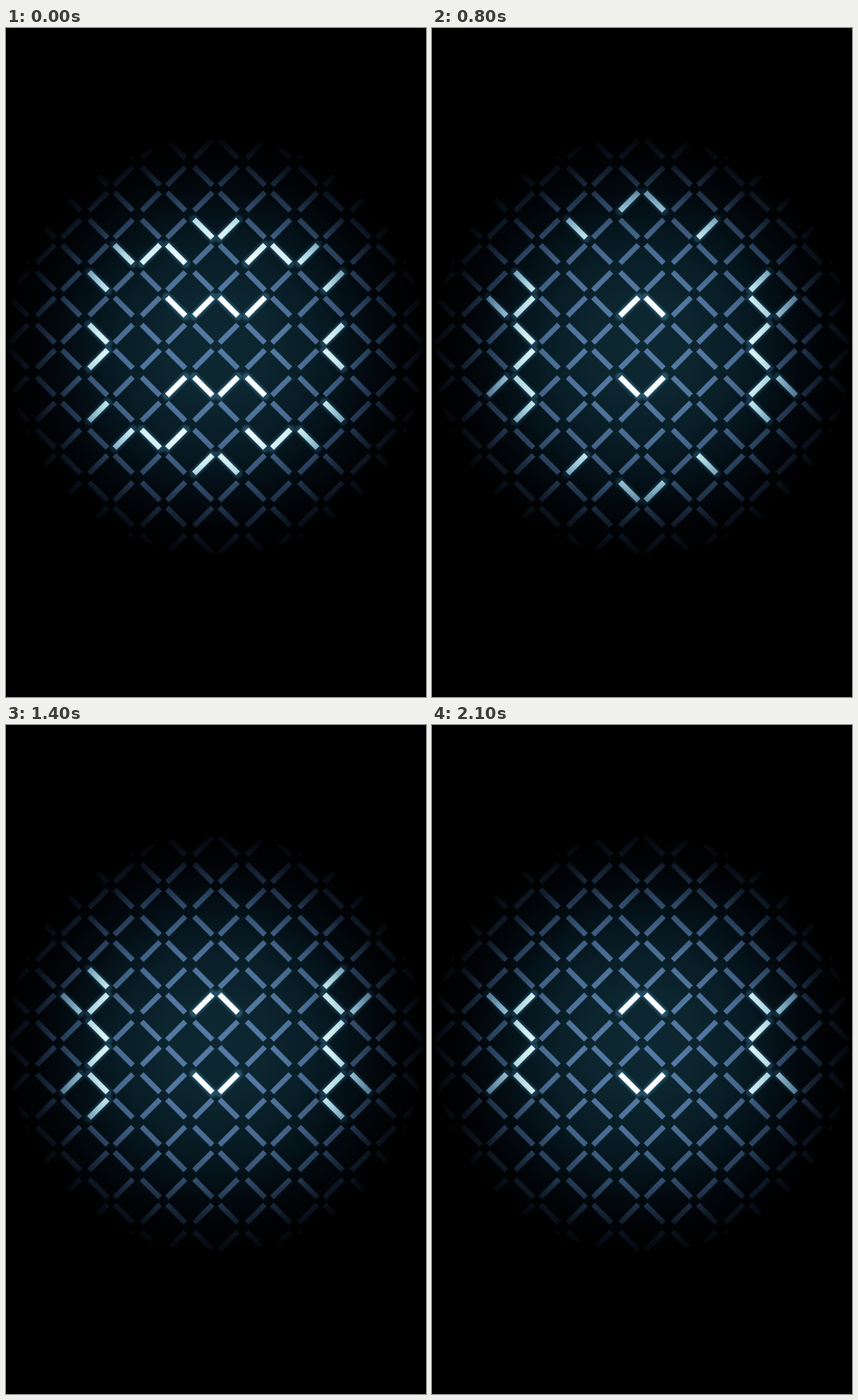
An HTML page with a canvas that plays this animation: 480 px wide and 764 px high, repeating every 2.2 s.

```html
<!DOCTYPE html>
<html lang="en">
<head>
<meta charset="utf-8">
<title>Lattice of light</title>
<style>
html, body { margin: 0; width: 100%; height: 100%; overflow: hidden; background: #000; }
canvas { display: block; width: 480px; height: 764px; }
</style>
</head>
<body>
<canvas id="stage" width="480" height="764"></canvas>
<script>
const ctx = document.getElementById('stage').getContext('2d');
const CX = 240, CY = 363.7, R = 238, CELL = 60;
const STEP = 100, STEPS = 22;

// [column, row, first step, end step], mirrored into all four quadrants
const lights = [
  [0, 1, 0, 22], [4, 0, 0, 22], [4, 2, 0, 20],
  [0, 4, 0, 2], [3, 3, 0, 2], [1, 3, 0, 2], [2, 3, 0, 2], [1, 1, 0, 2],
  [2, 0, 2, 7], [6, 0, 2, 7], [0, 5, 4, 10], [3, 2, 4, 7],
  [5, 1, 4, 22], [4, 1, 7, 22], [2, 4, 7, 10]
];

function radial(stops) {
  const g = ctx.createRadialGradient(CX, CY, 0, CX, CY, R);
  for (const [r, color] of stops) g.addColorStop(r / R, `rgb(${color})`);
  return g;
}

const haze = radial([
  [0, '13,40,50'], [60, '12,37,47'], [110, '8,29,38'],
  [150, '4,18,25'], [180, '2,9,14'], [205, '1,3,6'], [R, '0,0,0']
]);
const dim = radial([
  [0, '84,122,166'], [70, '82,119,160'], [115, '72,106,144'], [145, '58,88,122'],
  [170, '42,66,94'], [195, '24,39,58'], [215, '12,20,31'], [R, '3,6,10']
]);
const bright = radial([
  [0, '255,255,255'], [85, '255,255,255'], [110, '235,250,250'], [135, '208,236,238'],
  [150, '168,210,220'], [166, '126,168,188'], [182, '88,126,152'],
  [196, '54,82,106'], [212, '22,35,50'], [R, '3,6,10']
]);
const glow = radial([
  [0, '8,14,18'], [110, '8,14,18'], [150, '6,11,15'], [180, '3,6,8'], [215, '0,0,0']
]);

// Even indices leave their crossing outwards, odd ones inwards.
function span(i) {
  const node = Math.ceil(i / 2) * CELL;
  const dir = i % 2 ? -1 : 1;
  return [node + 4 * dir, node + 25 * dir];
}

function addArm(path, col, row) {
  const [x1, x2] = span(col), [y1, y2] = span(row);
  for (const sx of [-1, 1]) for (const sy of [-1, 1]) {
    path.moveTo(CX + sx * x1, CY + sy * y1);
    path.lineTo(CX + sx * x2, CY + sy * y2);
  }
}

function stroke(path, style, width) {
  ctx.strokeStyle = style;
  ctx.lineWidth = width;
  ctx.stroke(path);
}

const lattice = new Path2D();
for (let c = 0; c < 8; c++) for (let r = 0; r < 8; r++) addArm(lattice, c, r);

function draw(now) {
  const step = Math.floor(now / STEP) % STEPS;
  const lit = new Path2D();
  for (const [c, r, from, to] of lights) {
    if (step >= from && step < to) addArm(lit, c, r);
  }

  ctx.fillStyle = '#000';
  ctx.fillRect(0, 0, 480, 764);
  ctx.save();
  ctx.beginPath();
  ctx.arc(CX, CY, R, 0, Math.PI * 2);
  ctx.clip();
  ctx.fillStyle = haze;
  ctx.fillRect(0, 127, 480, 473);
  stroke(lattice, dim, 6);

  ctx.globalCompositeOperation = 'lighter';
  ctx.lineCap = 'round';
  for (const w of [13, 10, 8]) stroke(lit, glow, w);
  ctx.globalCompositeOperation = 'source-over';
  ctx.lineCap = 'butt';
  stroke(lit, bright, 6);
  ctx.restore();
}

const start = performance.now();
function frame() {
  draw(performance.now() - start);
  requestAnimationFrame(frame);
}
frame();
</script>
</body>
</html>
```
